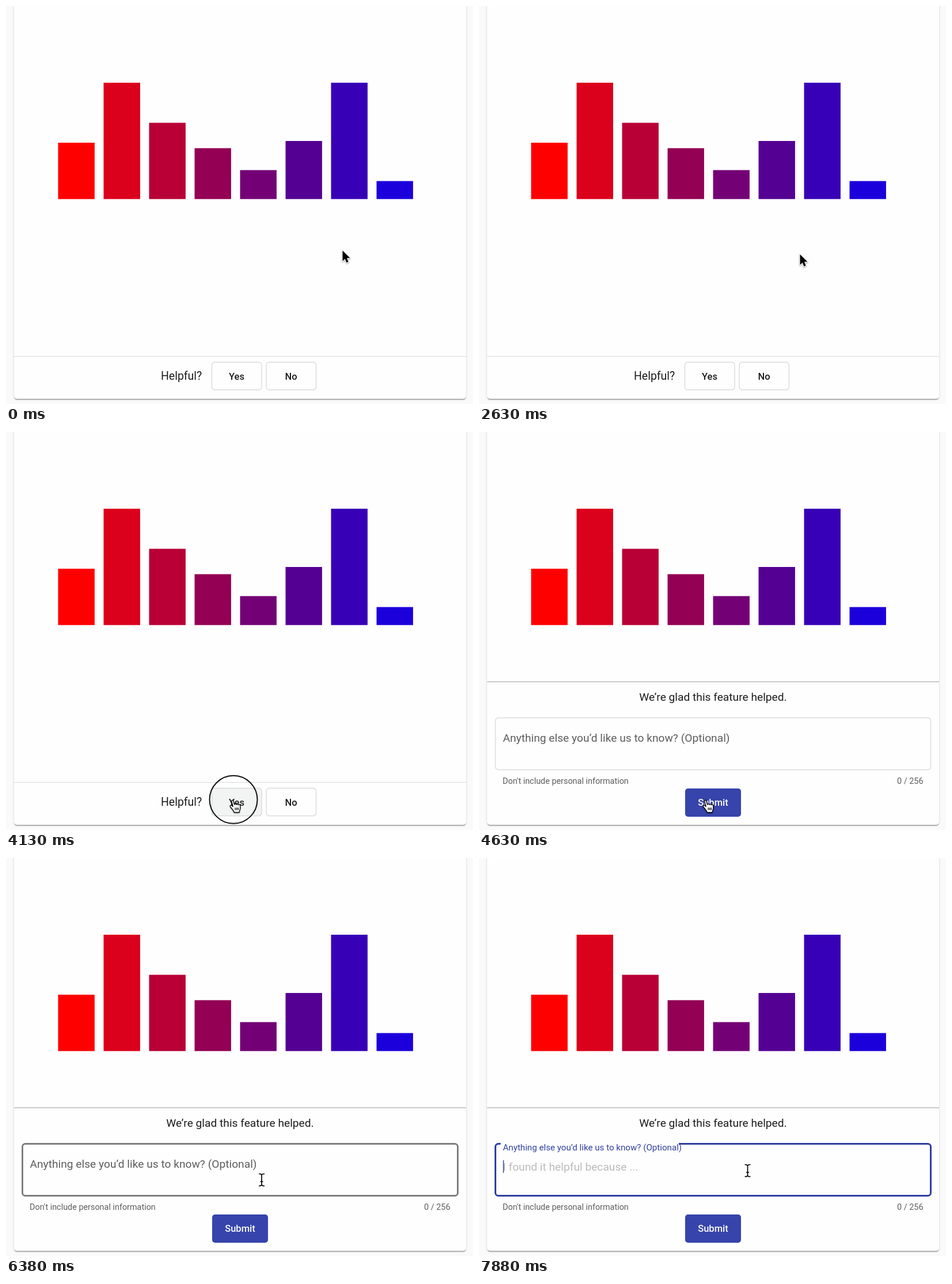
Animation, 811 px wide and 690 px high, one loop 8000 ms. Source, as an HTML page:

```html
<!DOCTYPE html>
<html lang="en">
<head>
<meta charset="utf-8">
<title>Feedback form</title>
<style>
  html, body { margin: 0; width: 100%; height: 100%; overflow: hidden; background: #fafafa; }
  .card {
    position: absolute; left: 14px; top: -20px; width: 785px; height: 701px;
    border-radius: 5px; background: #fefefe;
    box-shadow: 0 3px 1px -1px #0003, 0 1px 1px #0002, 0 1px 4px #0002;
  }
  svg { position: absolute; left: 0; top: 0; }
  text { font: 19.2px Roboto, sans-serif; fill: #1c1c1c; }
  .button { font-size: 16.5px; font-weight: 500; text-anchor: middle; }
  .hint { font-size: 14.4px; fill: #5c5c5c; }
  .outlined { fill: #fefefe; stroke: #d9d9d9; stroke-width: 1.3; }
  .pointer { filter: drop-shadow(0 1.5px 1.2px #0006); }
</style>
</head>
<body>
<div class="card"></div>
<svg width="811" height="690" viewBox="0 0 811 690">
  <g id="bars"></g>

  <g id="question">
    <path d="M14 607.5H799" stroke="#d9d9d9"/>
    <text x="268.9" y="648" style="font-size:19.5px">Helpful?</text>
    <rect id="yes" class="outlined" x="357.5" y="617.5" width="86.5" height="48" rx="5"/>
    <text class="button" x="400.5" y="648">Yes</text>
    <rect class="outlined" x="452" y="617.5" width="86.5" height="48" rx="5"/>
    <text class="button" x="495" y="648">No</text>
  </g>

  <g id="form">
    <path d="M14 433H799" stroke="#b9b9b9" stroke-width="1.3"/>
    <text x="406.5" y="466" text-anchor="middle">We’re glad this feature helped.</text>
    <rect class="outlined" x="28.5" y="495.5" width="756" height="90" rx="5"/>
    <rect id="thick" x="28.5" y="495.5" width="756" height="90" rx="5" fill="none" stroke-width="3"/>
    <path id="notch" d="M38 493H347V498H37Z" fill="#fefefe"/>
    <text id="label">Anything else you’d like us to know? (Optional)</text>
    <text id="placeholder" x="41.5" y="542">I found it helpful because ...</text>
    <path id="caret" d="M42.5 524V546" stroke="#303f9f" stroke-width="1.4"/>
    <text class="hint" x="41" y="609.5">Don't include personal information</text>
    <text class="hint" x="771.5" y="609.5" text-anchor="end">0 / 256</text>
    <rect x="358" y="618" width="97" height="49" rx="5" fill="#3644ab"/>
    <text class="button" x="406.5" y="648" style="fill:#fff">Submit</text>
  </g>

  <circle id="ring" fill="none" stroke="#111" stroke-width="2"/>

  <g id="arrow" class="pointer">
    <path d="M0 0V18.3L4.2 14.4L7 21L10.2 19.6L7.4 13.1H13Z" stroke="#fff" stroke-width="2.4" stroke-linejoin="round"/>
    <path d="M0 0V18.3L4.2 14.4L7 21L10.2 19.6L7.4 13.1H13Z"/>
  </g>
  <g id="hand" class="pointer" stroke="#000" stroke-width="1.3" stroke-linejoin="round">
    <path transform="translate(-8 -1)" fill="#fff" d="M8.2 22.5C7.8 20.4 6.5 19 5.2 17.3C4 15.6 1.2 13.2 1.2 11.6
      C1.2 10 3.2 9.7 4.4 10.8L6.2 12.4L4 4C3.4 1 6.3 .6 7 3L8.6 9.2C8.6 7.2 11.6 7.2 11.9 9.3
      C12.3 7.6 14.9 7.7 15.2 9.6C15.8 8.3 18.5 8.7 18.7 10.6C19.1 13.6 19 15.6 18 18.4C17.5 19.8 17.2 21 17.1 22.5Z
      M10.2 14.2V18.4M12.7 14.2V18.4M15.2 14.2V18.4"/>
  </g>
  <g id="beam" fill="none">
    <path d="M-5 -10.5Q0 -10.5 0 -8Q0 -10.5 5 -10.5M0 -8V8M-5 10.5Q0 10.5 0 8Q0 10.5 5 10.5M-2.5 3H2.5" stroke="#fff" stroke-width="3.4"/>
    <path d="M-5 -10.5Q0 -10.5 0 -8Q0 -10.5 5 -10.5M0 -8V8M-5 10.5Q0 10.5 0 8Q0 10.5 5 10.5M-2.5 3H2.5" stroke="#000" stroke-width="1.7"/>
  </g>
</svg>
<script>
const LOOP = 8000, STEP = 125;
const el = id => document.getElementById(id);
const show = (id, on) => { el(id).style.display = on ? '' : 'none'; };
const set = (id, attrs) => { for (const k in attrs) el(id).setAttribute(k, attrs[k]); };
const mix = (a, b, p) => a + (b - a) * p;
const progress = (t, start, length) => Math.min(1, Math.max(0, (t - start) / length));
const easeOut = p => 1 - (1 - p) ** 3;

const barTops = [237, 133, 202.5, 246.5, 284.5, 234, 133, 303.5];
const barColors = ['#f00', '#db001c', '#b80036', '#930054', '#740076', '#540093', '#3700b6', '#1c00db'];
el('bars').innerHTML = barTops.map((top, i) =>
  `<rect x="${90.5 + 79 * i}" y="${top}" width="63.4" height="${334.7 - top}" fill="${barColors[i]}"/>`).join('');

// Pointer path: time, x, y
const path = [
  [0, 584.5, 424], [2500, 584.5, 424], [2625, 557.5, 430.5], [2750, 525, 458], [2875, 482, 515],
  [3000, 440, 572], [3125, 407, 620], [3250, 386, 644], [3375, 380, 648], [3750, 396, 638],
  [5625, 396, 638], [5750, 399, 633], [5875, 406, 621], [6000, 417, 603], [6125, 429, 582],
  [6250, 438, 567], [6375, 444, 558], [6500, 449, 554], [7125, 466.5, 542], [LOOP, 466.5, 542],
];

function pointerAt(t) {
  const i = path.findIndex(point => point[0] > t);
  const [t0, x0, y0] = path[i - 1], [t1, x1, y1] = path[i];
  const p = (t - t0) / (t1 - t0);
  return [mix(x0, x1, p), mix(y0, y1, p)];
}

function drawPointer(t) {
  const [x, y] = pointerAt(t);
  const shape = t >= 6125 ? 'beam' : t >= 3125 && t < 6000 ? 'hand' : 'arrow';
  for (const id of ['arrow', 'hand', 'beam']) show(id, id === shape);
  set(shape, { transform: `translate(${x} ${y})` });
}

function drawRing(t) {
  const firstClick = t >= 625 && t < 875, secondClick = t >= 4125 && t < 4375;
  show('ring', firstClick || secondClick);
  if (firstClick) set('ring', { cx: 585, cy: 425, r: 30 });
  if (secondClick) set('ring', { cx: 395, cy: 637.3, r: t < 4250 ? 41.5 : 30 });
}

function drawField(t) {
  const hover = easeOut(progress(t, 6245, 600));
  const focus = progress(t, 7500, 300);
  const lift = easeOut(progress(t, 7690, 400));
  const rgb = (a, b) => `rgb(${a.map((v, i) => mix(v, b[i], focus))})`;
  set('thick', { stroke: rgb([30, 30, 30], [48, 63, 159]), opacity: hover });
  show('notch', lift > 0);
  set('label', { transform: `translate(41.5 ${mix(537, 501.5, lift)}) scale(${mix(1, 0.75, lift)})` });
  el('label').style.fill = rgb([92, 92, 92], [48, 63, 159]);
  el('placeholder').style.fill = '#000';
  set('placeholder', { opacity: 0.31 * lift });
  show('caret', lift > 0);
}

function draw(time) {
  const t = Math.floor((time % LOOP) / STEP) * STEP;
  const submitted = t >= 4375;
  show('question', !submitted);
  show('form', submitted);
  el('yes').style.fill = t >= 3125 ? '#f2f3f3' : '';
  drawField(t);
  drawRing(t);
  drawPointer(t);
}

const start = performance.now();
function tick() {
  draw(performance.now() - start);
  requestAnimationFrame(tick);
}
tick();
</script>
</body>
</html>
```
